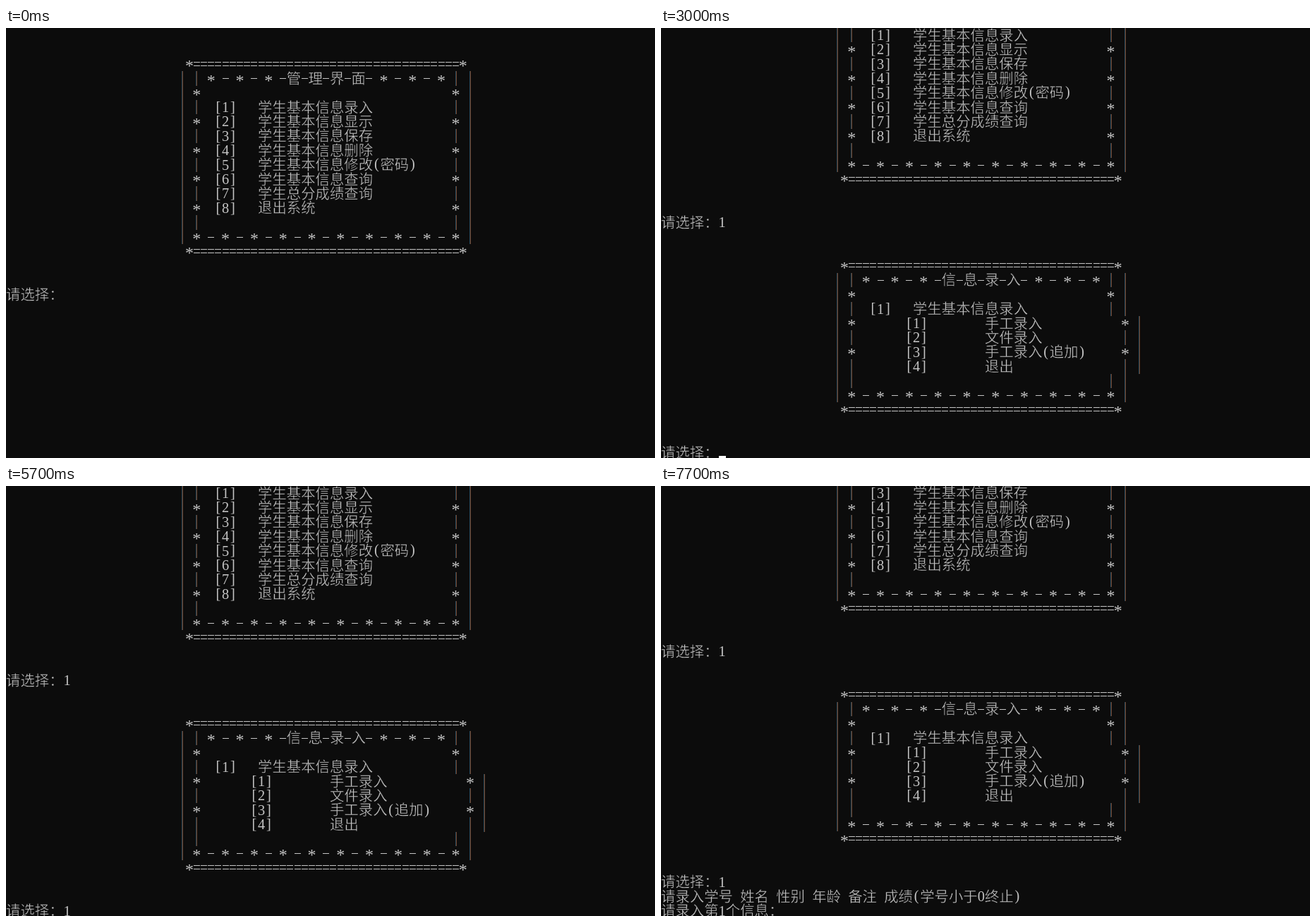
Animation of 920 by 609 pixels, one loop 8000 ms. Source, as an HTML page:

```html
<!DOCTYPE html>
<html lang="zh-CN">
<head>
<meta charset="utf-8">
<title>管理界面</title>
<style>
  html, body { margin: 0; width: 100%; height: 100%; overflow: hidden; background: #0c0c0c; }
  svg { display: block; width: 920px; height: 609px; }
  text { font-family: "Liberation Serif", serif; font-size: 20.4px; fill: #c4c4c4; text-anchor: middle; white-space: pre; }
  /* The background-coloured outline thins the strokes */
  text.han { font-family: "Noto Sans CJK SC", "Noto Sans CJK", sans-serif; font-weight: 300; text-anchor: start; stroke: #0c0c0c; stroke-width: .4px; }
  text.star { font-size: 24px; }
  rect { shape-rendering: crispEdges; }
</style>
</head>
<body>
<svg id="stage" viewBox="0 0 920 609" xmlns="http://www.w3.org/2000/svg">
  <rect width="920" height="609" fill="#0c0c0c"/>
  <g id="page"></g>
  <rect id="cursor" width="10" height="5" fill="#fff"/>
</svg>
<script>
const CW = 10.2, RH = 20.4, LOOP = 8000;
const page = document.getElementById('page');
const cursor = document.getElementById('cursor');

const isHan = c => c > '\u2fff';
const width = s => [...s].reduce((n, c) => n + (isHan(c) ? 2 : 1), 0);
const pad = (s, n) => s + ' '.repeat(n - width(s));

function add(parent, tag, attrs, text) {
  const el = document.createElementNS('http://www.w3.org/2000/svg', tag);
  for (const k in attrs) el.setAttribute(k, attrs[k]);
  if (text) el.textContent = text;
  parent.appendChild(el);
  return el;
}

// A bar straddles two pixels: a cool left fringe and a warm right one
function drawBar(g, x, y) {
  const top = Math.round(y), height = Math.round(y + RH) - top;
  add(g, 'rect', { x: x - 1, y: top, width: 1, height, fill: '#24475a' });
  add(g, 'rect', { x, y: top, width: 1, height, fill: '#75452c' });
}

function drawChar(g, c, col, y) {
  const x = col * CW, mid = x + CW / 2;
  const dash = dy => add(g, 'rect', { x: Math.round(x + .5), y: Math.round(y + dy), width: 9, height: 1, fill: '#c4c4c4' });
  if (c === '|') {
    drawBar(g, Math.round(mid), y);
  } else if (c === '-') {
    dash(10);
  } else if (c === '=') {
    dash(7);
    dash(12);
  } else if (c === '*') {
    add(g, 'text', { class: 'star', x: mid, y: y + 20.4 }, c);
  } else {
    add(g, 'text', { x: mid, y: y + ('[]()'.includes(c) ? 15.8 : 17) }, c);
  }
}

function drawLine(g, row, col, line) {
  const y = row * RH;
  for (const run of line.match(/[\u3000-\uffff]+|[^\u3000-\uffff]/g) || []) {
    if (isHan(run)) add(g, 'text', { class: 'han', x: col * CW, y: y + 17.5 }, run);
    else if (run !== ' ') drawChar(g, run, col, y);
    col += width(run);
  }
}

function drawBlock(row, col, lines) {
  const g = add(page, 'g', {});
  lines.forEach((s, i) => drawLine(g, row + i, col, s));
  return g;
}

const edge = i => i % 2 ? '|' : '*';
const item = (e, s, n = 35) => '| ' + e + pad(s, n) + e + ' |';
const rule = ' *' + '='.repeat(37) + '*';
const box = (title, body) => [
  rule,
  '| | * - * - * -' + [...title].join('-') + '- * - * - * | |',
  item('*', ''),
  ...body,
  item('|', ''),
  '| ' + '* - '.repeat(9) + '* |',
  rule
];

const menu = ['学生基本信息录入', '学生基本信息显示', '学生基本信息保存', '学生基本信息删除',
  '学生基本信息修改(密码)', '学生基本信息查询', '学生总分成绩查询', '退出系统'];
const entry = (s, i) => `  [${i + 1}]   ${s}`;
const sub = ['手工录入', '文件录入', '手工录入(追加)', '退出'];

drawBlock(2, 24, box('管理界面', menu.map((s, i) => item(edge(i + 1), entry(s, i)))));
drawBlock(18, 0, ['请选择：']);
const firstKey = drawBlock(18, 8, ['1']);

const second = [
  drawBlock(21, 24, box('信息录入', [
    item('|', entry(menu[0], 0)),
    ...sub.map((s, i) => item(edge(i), `       [${i + 1}]        ${s}`, 37))
  ])),
  drawBlock(34, 0, ['请选择：'])
];
const secondKey = drawBlock(34, 8, ['1']);
const third = drawBlock(35, 0, [
  '请录入学号 姓名 性别 年龄 备注 成绩(学号小于0终止)',
  '请录入第1个信息：'
]);

// Start time, rows scrolled, cursor row and column
const steps = [
  [0, 0, 18, 8],
  [2200, 0, 18, 9],
  [3000, 5, 34, 8],
  [5600, 5, 34, 9],
  [6800, 7, 36, 17]
];
const blinks = [900, 1400, 1900, 2400, 2800, 3800, 4300, 4800, 5300, 5700, 6200, 6700, 6800, 7700];

const show = (el, on) => el.setAttribute('visibility', on ? 'visible' : 'hidden');

function render(t) {
  const n = steps.filter(s => s[0] <= t).length - 1;
  const [, scroll, row, col] = steps[n];
  page.setAttribute('transform', `translate(0 ${-scroll * RH})`);
  show(firstKey, n >= 1);
  second.forEach(g => show(g, n >= 2));
  show(secondKey, n >= 3);
  show(third, n >= 4);
  cursor.setAttribute('x', Math.round(col * CW));
  cursor.setAttribute('y', Math.round((row - scroll) * RH + 14.8));
  show(cursor, blinks.filter(b => b <= t).length % 2);
}

const start = performance.now();
function tick() {
  render((performance.now() - start) % LOOP);
  requestAnimationFrame(tick);
}
tick();
</script>
</body>
</html>
```
